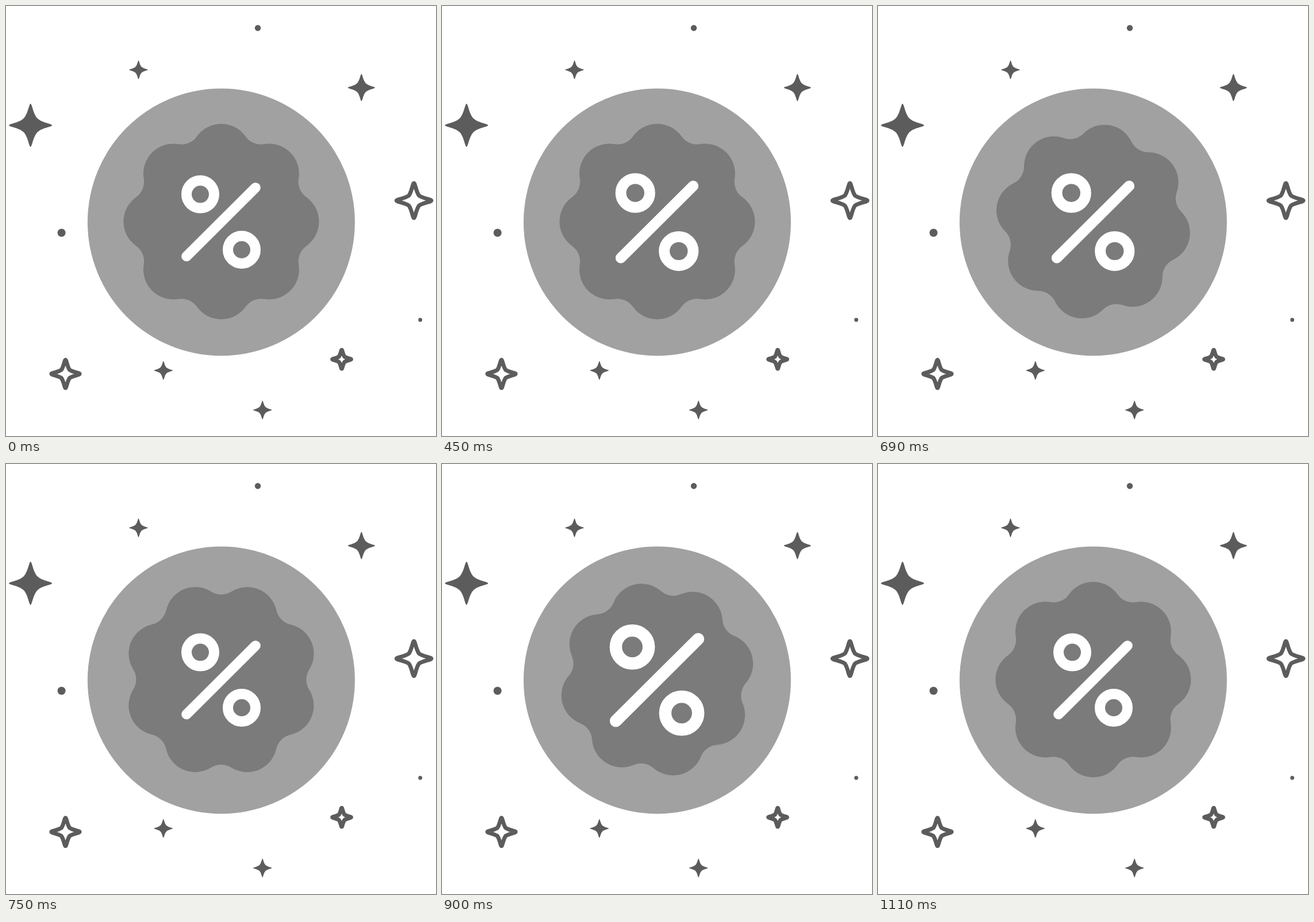
Recreate the animation shown at these times as an HTML page. Size 748 by 748 pixels, loop 1320 ms.

```html
<!DOCTYPE html>
<html lang="en">
<head>
<meta charset="utf-8">
<title>Discount badge</title>
<style>
  html, body { margin: 0; width: 100%; height: 100%; overflow: hidden; background: #fff; }
  svg { display: block; width: 100%; height: 100%; }
</style>
</head>
<body>
<svg viewBox="0 0 748 748">
  <g id="sky" fill="#5c5c5c"></g>
  <circle cx="374.4" cy="376" r="232.5" fill="#a1a1a1"/>
  <path id="badge" fill="#7b7b7b"/>
  <g id="percent" fill="none" stroke="#fff">
    <circle cx="338" cy="327.6" r="24" stroke-width="18"/>
    <circle cx="410" cy="424" r="24" stroke-width="18"/>
    <path d="M314 435.4L434 316" stroke-width="17.6" stroke-linecap="round"/>
  </g>
</svg>
<script>
const LOOP = 1320, STEP = 30;
const sky = document.getElementById('sky');
const badge = document.getElementById('badge');
const percent = document.getElementById('percent');

function add(tag, attrs) {
  const el = document.createElementNS('http://www.w3.org/2000/svg', tag);
  for (const key in attrs) el.setAttribute(key, attrs[key]);
  sky.appendChild(el);
}

// Four-pointed star; waist is the diagonal offset between two points.
function starPath(cx, cy, r, waist) {
  const arm = [[0.07, -1], [0.12, -0.52], [waist, -waist], [0.52, -0.12], [1, -0.07], [1, 0]];
  let d = `M${cx} ${cy - r}`;
  for (let q = 0; q < 4; q++) {
    const pts = arm.map(([x, y]) => {
      for (let i = 0; i < q; i++) [x, y] = [-y, x];
      return `${cx + x * r} ${cy + y * r}`;
    });
    d += `C${pts.slice(0, 3)}C${pts.slice(3)}`;
  }
  return d + 'Z';
}

// Eight round lobes joined by tangent fillets.
function badgePath(cx, cy) {
  const lobe = 52, fillet = 32.8, lobeDist = 118, filletDist = 180.8;
  const at = (r, a) => [r * Math.sin(a), -r * Math.cos(a)];
  const k = lobe / (lobe + fillet);
  const touch = (a, b) => {
    const [x, y] = at(lobeDist, a), [u, v] = at(filletDist, b);
    return `${cx + x + (u - x) * k} ${cy + y + (v - y) * k}`;
  };
  const half = Math.PI / 8;
  let d = 'M' + touch(0, -half);
  for (let i = 0; i < 8; i++) {
    const a = i * 2 * half;
    d += `A${lobe} ${lobe} 0 0 1 ${touch(a, a + half)}`;
    d += `A${fillet} ${fillet} 0 0 0 ${touch(a + 2 * half, a + half)}`;
  }
  return d + 'Z';
}

for (const [x, y, r] of [[42.7, 207.5, 37.5], [230.5, 111, 16.2], [618.3, 142, 23.7],
                         [273.8, 634, 16.2], [446.2, 702.7, 16.2]])
  add('path', { d: starPath(x, y, r, 0.32) });

for (const [x, y, r] of [[709.6, 338.5, 30.3], [103.5, 640, 24.6], [584, 614.6, 16.4]])
  add('path', { d: starPath(x, y, r, 0.29), fill: '#fff', stroke: '#5c5c5c',
                'stroke-width': 7, 'stroke-linejoin': 'round' });

for (const [cx, cy, r] of [[438, 38.3, 5.2], [96.6, 394.5, 7], [720.6, 546, 3.4]])
  add('circle', { cx, cy, r });

badge.setAttribute('d', badgePath(374.4, 375));

// Quarter turn, quintic ease in and out.
function turn(t) {
  if (t < 450 || t >= 1110) return 0;
  const u = (t - 368.5) / 438;
  return u < 1 ? 45 * u ** 5 : 90 - 45 * (2 - u) ** 5;
}

const pulse = (t, peak, half, gain) => gain * Math.max(0, 1 - Math.abs(t - peak) / half);
const zoom = t => 1 + pulse(t, 570, 150, 0.245) + pulse(t, 910, 130, 0.21);

function draw(now) {
  const t = Math.floor((now - start) % LOOP / STEP) * STEP;
  badge.setAttribute('transform', `rotate(${turn(t)} 374.4 375)`);
  percent.setAttribute('transform',
    `translate(374 375.7) scale(${zoom(t)}) translate(-374 -375.7)`);
}

const start = performance.now();
function tick() {
  draw(performance.now());
  requestAnimationFrame(tick);
}
tick();
</script>
</body>
</html>
```
